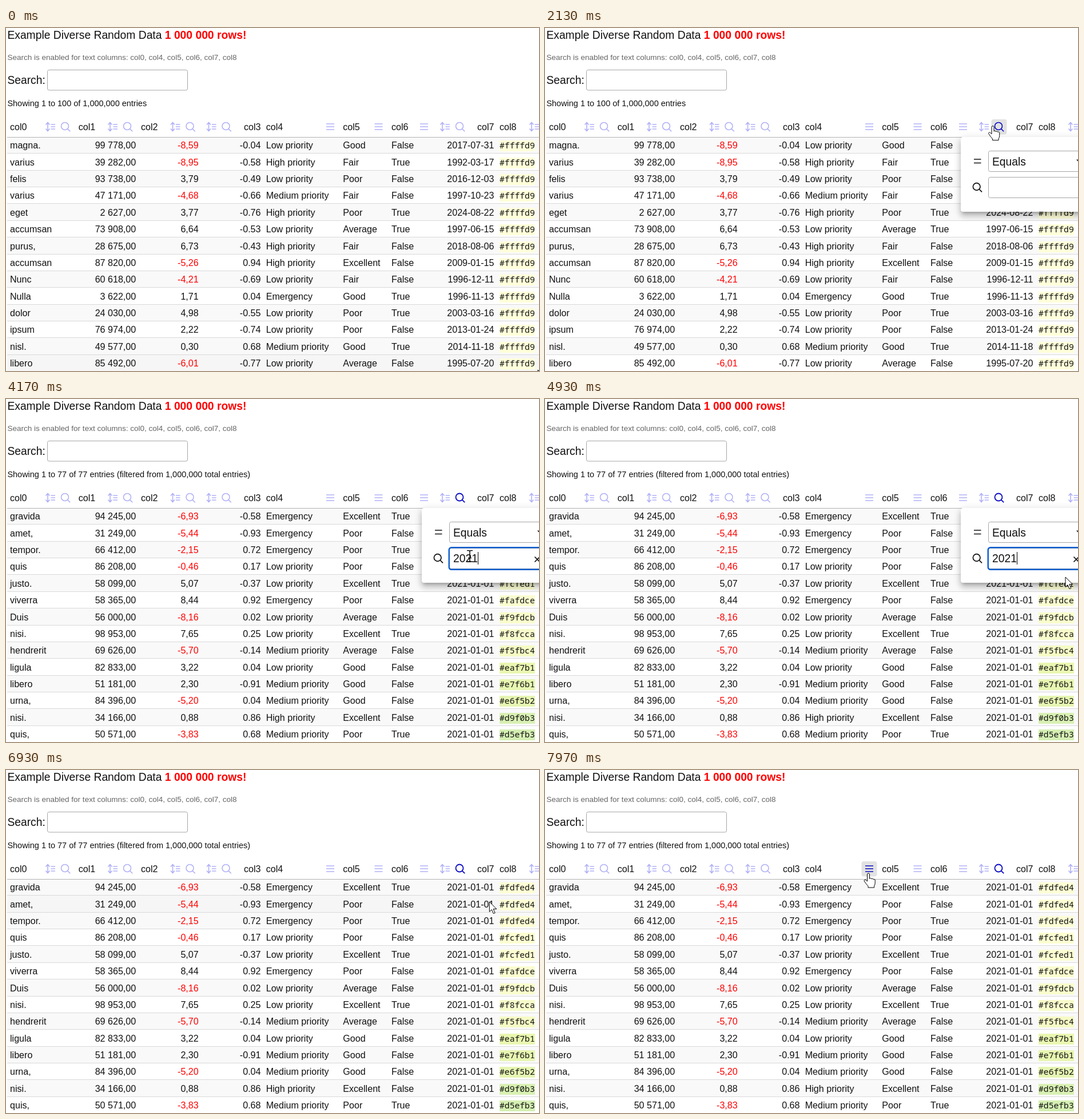
These frames come from a looping animation (932x601 px, 8 s). An HTML page:

```html
<!DOCTYPE html>
<html lang="en">
<head>
<meta charset="utf-8">
<title>Data table with column search</title>
<style>
html, body { margin: 0; width: 100%; height: 100%; overflow: hidden; background: #fff; }
#stage { position: relative; width: 932px; height: 601px; overflow: hidden; }
svg { position: absolute; left: 0; top: 0; display: block; overflow: hidden; }
text { font-family: "Liberation Sans", Arial, sans-serif; font-size: 16.08px; fill: #111; white-space: pre; }
.code { font-family: "Noto Sans Mono", "DejaVu Sans Mono", monospace; font-size: 14.7px; }
.big { font-size: 19.3px; }
.info { font-size: 14.47px; }
.note { font-size: 13.53px; fill: #666; }
.alert { font-weight: bold; fill: #f00; }
.neg { fill: #f00; }
.line { fill: none; stroke: #111; stroke-width: 1.7; }
.box { fill: #fff; stroke: #a6a6a6; }
.icon path { fill: none; stroke: #b1b1f7; stroke-width: 1.6; }
.icon rect { fill: none; }
.icon.on path { stroke: #0808c4; stroke-width: 1.8; }
.icon.over path { stroke: #0808c4; }
.icon.over rect { fill: #e2e2e2; }
.pointer { fill: #fff; stroke: #000; stroke-linejoin: round; }
#panel {
  position: absolute; left: 727px; top: 191px; width: 260px; height: 130.5px;
  background: #fff; border-radius: 4px;
  box-shadow: 0 5px 5px -3px rgba(0,0,0,.2), 0 8px 10px 1px rgba(0,0,0,.14), 0 3px 14px 2px rgba(0,0,0,.12);
}
</style>
</head>
<body>
<div id="stage">
  <svg id="page" width="932" height="601">
    <text class="big" x="2.4" y="19.4">Example Diverse Random Data <tspan class="alert">1 000 000 rows!</tspan></text>
    <text class="note" x="2.4" y="55.5">Search is enabled for text columns: col0, col4, col5, col6, col7, col8</text>
    <text class="big" x="2.4" y="98">Search:</text>
    <rect class="box" x="72.5" y="73.5" width="245" height="35.5" rx="3"/>
    <text class="info" x="2.4" y="136.5" id="info"></text>
  </svg>
  <div id="panel"></div>
  <svg id="form" width="932" height="601">
    <path class="line" d="M750 230h12.5M750 236.5h12.5"/>
    <rect class="box" x="775.5" y="215.5" width="180" height="36" rx="3"/>
    <text class="big" x="782" y="240.5">Equals</text>
    <path class="line" d="M930 230.5l5 5"/>
    <path class="line" d="M761 278a6.3 6.3 0 1 1-12.6 0 6.3 6.3 0 0 1 12.6 0M759.2 282.5l4.8 4.8"/>
    <rect class="box" x="775.5" y="261.5" width="180" height="36" rx="3"/>
    <rect id="ring" x="774.75" y="260.25" width="182" height="38.5" rx="4" fill="none" stroke="#0f5fcf" stroke-width="2.5"/>
    <g id="query">
      <text class="big" x="782" y="286">2021</text>
      <path class="line" d="M924.5 276.5l9 9M924.5 285.5l9-9"/>
    </g>
    <rect id="caret" y="268" width="1" height="22" fill="#000"/>
  </svg>
  <svg width="932" height="601">
    <g id="cursor">
      <path class="pointer" d="M0 0V17.5l4-3.8 3 7 2.8-1.2-3-6.8h5.7z"/>
      <path class="pointer" d="M-2 14V2a2 2 0 0 1 4 0v7.5a1.8 1.8 0 0 1 3.4.6 1.8 1.8 0 0 1 3.3.8 1.7 1.7 0 0 1 3 1.1V17q0 3-1.6 5.2V25H-.5v-2.5q-3-3-6.5-8.5a1.7 1.7 0 0 1 2.6-2.2z"/>
      <path class="line" style="stroke-width:1.5" d="M-5-9.5h3q2 0 2 2V8q0 2-2 2h-3M5-9.5H2q-2 0-2 2V8q0 2 2 2h3M-3 3.5h6"/>
    </g>
  </svg>
</div>
<script>
const LOOP = 8000, TOP = 191, PITCH = 29.36;
const TYPED = 4170, OPEN = 1800, FOCUS = 2730, BLUR = 6000, CLOSE = 6100;

const allRows = `magna.|99 778,00|-8,59|-0.04|Low priority|Good|False|2017-07-31
varius|39 282,00|-8,95|-0.58|High priority|Fair|True|1992-03-17
felis|93 738,00|3,79|-0.49|Low priority|Poor|False|2016-12-03
varius|47 171,00|-4,68|-0.66|Medium priority|Fair|False|1997-10-23
eget|2 627,00|3,77|-0.76|High priority|Poor|True|2024-08-22
accumsan|73 908,00|6,64|-0.53|Low priority|Average|True|1997-06-15
purus,|28 675,00|6,73|-0.43|High priority|Fair|False|2018-08-06
accumsan|87 820,00|-5,26|0.94|High priority|Excellent|False|2009-01-15
Nunc|60 618,00|-4,21|-0.69|Low priority|Fair|False|1996-12-11
Nulla|3 622,00|1,71|0.04|Emergency|Good|True|1996-11-13
dolor|24 030,00|4,98|-0.55|Low priority|Poor|True|2003-03-16
ipsum|76 974,00|2,22|-0.74|Low priority|Poor|False|2013-01-24
nisl.|49 577,00|0,30|0.68|Medium priority|Good|True|2014-11-18
libero|85 492,00|-6,01|-0.77|Low priority|Average|False|1995-07-20`
  .split("\n").map(r => (r + "|#ffffd9").split("|"));

const foundRows = `gravida|94 245,00|-6,93|-0.58|Emergency|Excellent|True|#fdfed4
amet,|31 249,00|-5,44|-0.93|Emergency|Poor|False|#fdfed4
tempor.|66 412,00|-2,15|0.72|Emergency|Poor|True|#fdfed4
quis|86 208,00|-0,46|0.17|Low priority|Poor|False|#fcfed1
justo.|58 099,00|5,07|-0.37|Low priority|Excellent|True|#fcfed1
viverra|58 365,00|8,44|0.92|Emergency|Poor|False|#fafdce
Duis|56 000,00|-8,16|0.02|Low priority|Average|False|#f9fdcb
nisi.|98 953,00|7,65|0.25|Low priority|Excellent|True|#f8fcca
hendrerit|69 626,00|-5,70|-0.14|Medium priority|Average|False|#f5fbc4
ligula|82 833,00|3,22|0.04|Low priority|Good|False|#eaf7b1
libero|51 181,00|2,30|-0.91|Medium priority|Good|False|#e7f6b1
urna,|84 396,00|-5,20|0.04|Medium priority|Good|False|#e6f5b2
nisi.|34 166,00|0,88|0.86|High priority|Excellent|False|#d9f0b3
quis,|50 571,00|-3,83|0.68|Medium priority|Poor|True|#d5efb3`
  .split("\n").map(r => r.replace("|#", "|2021-01-01|#").split("|"));

// Column edge; negative means right aligned
const columns = [7, -227.2, -336.7, -445.5, 454.7, 589.3, 674, -853.5, 863];
const headings = [7, 126.7, 236, -445.5, 454.7, 589.3, 674, -853.5, 863];

const $ = id => document.getElementById(id);
const page = $("page"), info = $("info"), cursor = $("cursor");

function add(parent, tag, attrs, text) {
  const el = document.createElementNS("http://www.w3.org/2000/svg", tag);
  for (const k in attrs) el.setAttribute(k, attrs[k]);
  if (text) el.textContent = text;
  return parent.appendChild(el);
}

function label(parent, edge, y, text, cls = "") {
  add(parent, "text", { x: Math.abs(edge), y, class: cls, "text-anchor": edge < 0 ? "end" : "start" }, text);
}

const show = (el, on) => el.setAttribute("visibility", on ? "visible" : "hidden");
const rowTop = i => TOP + Math.round(i * PITCH);

// Row backgrounds and rules
const hovers = allRows.map((_, i) => {
  const area = { x: 2, y: rowTop(i), width: 930, height: rowTop(i + 1) - rowTop(i) };
  if (i % 2 === 0) add(page, "rect", { ...area, fill: "#000", opacity: 0.023 });
  const hover = add(page, "rect", { ...area, fill: "#000", opacity: 0.035 });
  add(page, "rect", { x: 2, y: rowTop(i) + (i ? -1 : 0), width: 930, height: 1, fill: i ? "#d9d9d9" : "#b3b3b3" });
  return hover;
});

function table(rows) {
  const g = add(page, "g", {});
  rows.forEach((row, i) => {
    const y = Math.round(211.4 + i * PITCH);
    add(g, "rect", { x: 863, y: y - 14, width: 62, height: 19, fill: row[8] });
    row.forEach((cell, c) => label(g, columns[c], y, cell,
      c === 8 ? "code" : c === 2 && cell[0] === "-" ? "neg" : ""));
  });
  return g;
}
const fullTable = table(allRows), foundTable = table(foundRows);

headings.forEach((edge, i) => label(page, edge, 178.5, "col" + i));

const glyphs = {
  sort: "M-4-7v14M-7.5-3.5l3.5-4 3.5 4M-7.5 3.5l3.5 4 3.5-4M1.5-4H9M1.5 0H9M1.5 4H9",
  find: "M5.5-1a6.5 6.5 0 1 1-13 0 6.5 6.5 0 0 1 13 0M3.6 3.6l4.6 4.6",
  menu: "M-7-5H7M-7 0H7M-7 5H7"
};
const icons = [];
function icon(kind, x) {
  const el = add(page, "g", { class: "icon", transform: `translate(${x} 173)` });
  add(el, "rect", { x: -13.5, y: -13, width: 27, height: 26.5, rx: 4 });
  add(el, "path", { d: glyphs[kind] });
  icons.push({ el, x, filter: kind === "find" && x > 700 });
}
[77, 186, 295.5, 358.5, 767, 923].forEach(x => icon("sort", x));
[104, 213, 322.5, 385.5, 794].forEach(x => icon("find", x));
[567, 651.5, 731].forEach(x => icon("menu", x));

// Pointer path: time, x, y
const path = [
  [0, 930, 599], [670, 930, 599], [770, 929, 587], [930, 929, 587],
  [1040, 888, 430], [1130, 822, 262], [1230, 789, 181.5], [1330, 784, 172],
  [1599, 784, 172], [1600, 783, 171.5], [2130, 783, 171.5],
  [2300, 788, 196], [2500, 806, 257], [2640, 811, 275], [4630, 811, 275],
  [4780, 868, 297], [4930, 910, 312], [5270, 910, 312], [5470, 938, 258],
  [5471, 960, 0], [6369, 960, 0], [6370, 960, 241], [6770, 940, 241],
  [6930, 846, 231], [7250, 640, 196], [7600, 455, 165],
  [7760, 520, 171], [7880, 560, 180], [7970, 565.5, 181], [LOOP, 565.5, 181]
];

function pointer(t) {
  const i = Math.max(1, path.findIndex(p => p[0] >= t));
  const [t0, x0, y0] = path[i - 1], [t1, x1, y1] = path[i];
  const k = Math.max(0, (t - t0) / (t1 - t0));
  return [x0 + (x1 - x0) * k, y0 + (y1 - y0) * k];
}

const overIcon = (ic, [x, y]) => Math.abs(x - ic.x) < 13.5 && Math.abs(y - 173) < 13.5;

// Caret toggles
const blinks = [FOCUS, 3300, 3830, 4400, 4930, 5470];

function draw(t) {
  const pos = pointer(t), [x, y] = pos, lagged = pointer(Math.max(0, t - 60));
  const open = t >= OPEN && t < CLOSE, found = t >= TYPED;
  const focus = t >= FOCUS && t < BLUR;
  const inPanel = open && x > 727 && y > 191 && y < 322;

  info.textContent = found
    ? "Showing 1 to 77 of 77 entries (filtered from 1,000,000 total entries)"
    : "Showing 1 to 100 of 1,000,000 entries";
  show(fullTable, !found);
  show(foundTable, found);
  hovers.forEach((h, i) => show(h, !inPanel && y >= rowTop(i) && y < rowTop(i + 1)));
  icons.forEach(ic => {
    const over = overIcon(ic, pos) && overIcon(ic, lagged);
    ic.el.setAttribute("class", "icon" + (over ? " over" : "") + (ic.filter && found ? " on" : ""));
  });

  $("panel").style.display = $("form").style.display = open ? "block" : "none";
  $("ring").style.display = focus ? "" : "none";
  $("query").style.display = found ? "" : "none";
  const caretOn = focus && blinks.filter(b => b <= t).length % 2 === 1;
  $("caret").style.display = caretOn ? "" : "none";
  $("caret").setAttribute("x", found ? 825 : 782);

  const inInput = inPanel && x > 775 && y > 261 && y < 298;
  const shape = inInput ? 2 : icons.some(ic => overIcon(ic, pos)) ? 1 : 0;
  [...cursor.children].forEach((c, i) => show(c, i === shape));
  cursor.setAttribute("transform", `translate(${x} ${y})`);
}

const start = performance.now();
function tick() {
  draw((performance.now() - start) % LOOP);
  requestAnimationFrame(tick);
}
tick();
</script>
</body>
</html>
```
